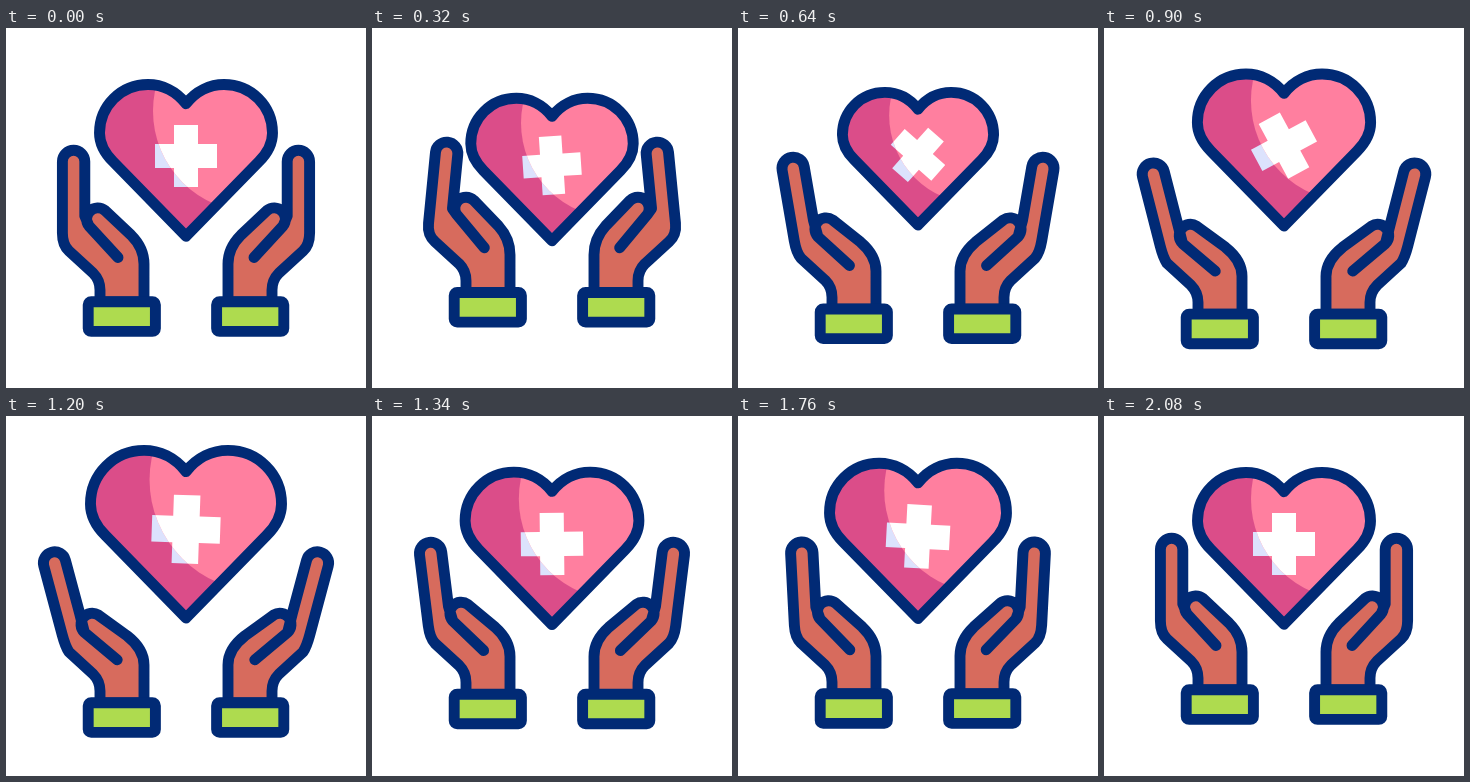
These frames come from a looping animation (360 px wide and 360 px high, 2320 ms). An HTML page:

```html
<!DOCTYPE html>
<html lang="en">
<head>
<meta charset="utf-8">
<title>Caring hands</title>
<style>
  html, body { margin: 0; width: 100%; height: 100%; overflow: hidden; background: #fff; }
  svg { display: block; width: 100vw; height: 100vh; }
  .line {
    stroke: #012a75; stroke-width: 10.9; stroke-linecap: round; stroke-linejoin: round;
    vector-effect: non-scaling-stroke;
  }
</style>
</head>
<body>
<svg viewBox="0 0 360 360">
  <defs>
    <path id="shape" vector-effect="non-scaling-stroke" d="M180 75.7C170 63 156 56.5 142 56.5C115 56.5 93.5 78 93.5 105C93.5 117 99 125.5 107 133.5L180 208.3L253 133.5C261 125.5 266.5 117 266.5 105C266.5 78 245 56.5 218 56.5C204 56.5 190 63 180 75.7Z"/>
    <path id="cross" d="M168 97h24v19h19v24h-19v19h-24v-19h-19v-24h19z"/>
    <clipPath id="light"><circle cx="248" cy="83" r="101"/></clipPath>
    <g id="hand" class="line">
      <path id="palm" fill="#d76b5d"/>
      <rect x="82.2" y="273.8" width="67.2" height="29.6" rx="3" fill="#aedb4f"/>
    </g>
  </defs>
  <g id="heart">
    <use href="#shape" fill="#db4d89"/>
    <use href="#cross" class="spin" fill="#dce2fd"/>
    <g clip-path="url(#light)">
      <use href="#shape" fill="#ff7f9f"/>
      <use href="#cross" class="spin" fill="#fff"/>
    </g>
    <use href="#shape" class="line" fill="none"/>
  </g>
  <g id="hands">
    <use href="#hand"/>
    <use href="#hand" transform="matrix(-1 0 0 1 360 0)"/>
  </g>
</svg>
<script>
const LOOP = 2320;
const $ = id => document.getElementById(id);
const spinners = document.querySelectorAll('.spin');

const swing = p => (1 - Math.cos(Math.PI * p)) / 2;
const easeOut = power => p => 1 - (1 - p) ** power;

// Every part dips, rises with its own easing, then sways back to rest on shared beats.
function track(dipTime, rise, ...poses) {
  const beats = [200, dipTime, 1225, 1490, 1765, 2080];
  return t => {
    const i = beats.findIndex(beat => t < beat);
    if (i < 1) return poses[i ? poses.length - 1 : 0];
    const p = (t - beats[i - 1]) / (beats[i] - beats[i - 1]);
    const ease = i === 2 ? rise : swing;
    return poses[i - 1] + (poses[i] - poses[i - 1]) * ease(p);
  };
}

const lift = track(360, easeOut(3.6), 0, -10.8, 13, -8.4, 4, 0);
const bend = track(360, easeOut(3.6), 0, -6.5, 15, -4.7, 3, 0);
const drop = track(380, easeOut(2), 0, 12, -14.2, 21, -7.5, 0);
const size = track(480, swing, 1, .845, 1.105, .856, 1.023, 1);
const turn = track(380, easeOut(2.6), 0, -5, 362, 355.5, 363, 360);

// Returns a function that leans points to the left around a pivot.
function joint(px, py, degrees) {
  const a = degrees * Math.PI / 180, c = Math.cos(a), s = Math.sin(a);
  return (x, y) => `${px + (x - px) * c + (y - py) * s} ${py + (y - py) * c - (x - px) * s} `;
}

function palmPath(angle) {
  const finger = joint(60, 206, angle), thumb = joint(122, 236, angle / 2);
  return `M94 274V262Q94 252 87 245L63 223Q${finger(56.4, 217)}${finger(56.4, 205)}` +
    `L${finger(56.4, 133.5)}A11.2 11.2 0 0 1 ${finger(78.8, 133.5)}L${finger(78.8, 188)}` +
    `L${thumb(83, 198)}A11.2 11.2 0 0 1 ${thumb(99, 182.5)}L${thumb(125, 207)}` +
    `Q138 220 138 236V274ZM${thumb(83, 198)}L${thumb(112, 229.5)}`;
}

function draw(t) {
  $('palm').setAttribute('d', palmPath(bend(t)));
  $('hands').setAttribute('transform', `translate(0 ${lift(t)})`);
  $('heart').setAttribute('transform',
    `translate(180 ${132.5 + drop(t)}) scale(${size(t)}) translate(-180 -132.5)`);
  for (const el of spinners) el.setAttribute('transform', `rotate(${turn(t)} 180 128)`);
}

const start = performance.now();
function tick() {
  draw((performance.now() - start) % LOOP);
  requestAnimationFrame(tick);
}
tick();
</script>
</body>
</html>
```
